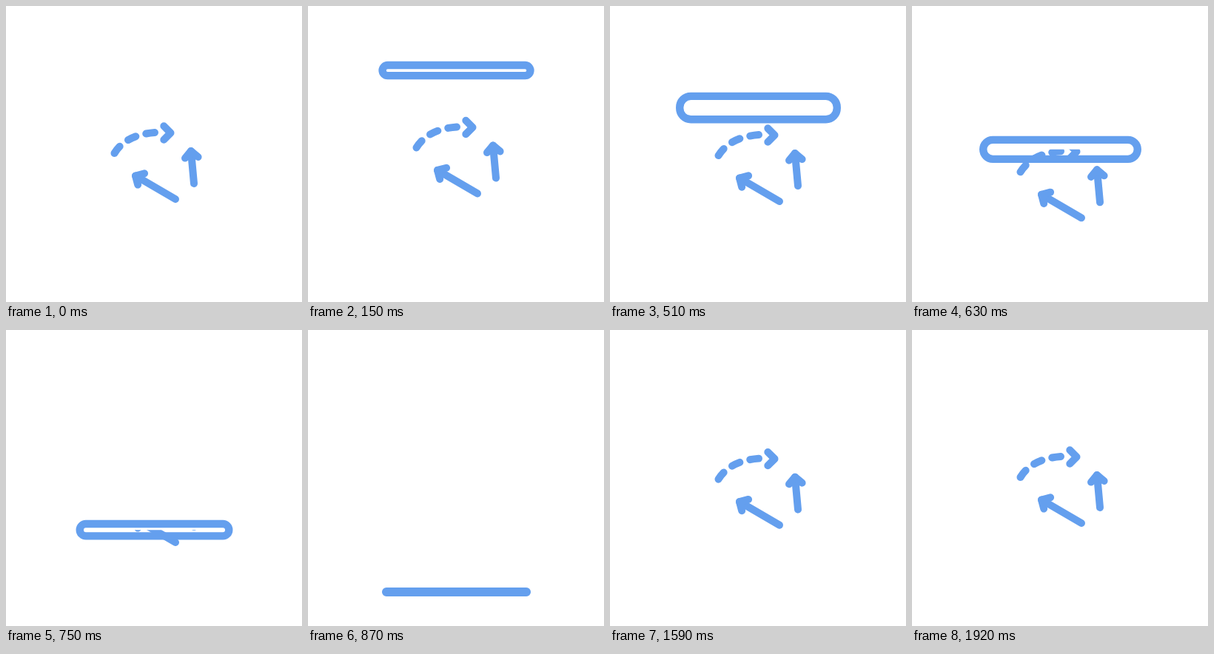
These frames come from a looping animation (400 px wide and 400 px high, 2130 ms). An HTML page with a canvas:

```html
<!DOCTYPE html>
<html>
<head>
<meta charset="utf-8">
<style>
  html, body { margin: 0; width: 100%; height: 100%; overflow: hidden; background: #fff; }
  canvas { display: block; width: 100vw; height: 100vh; }
</style>
</head>
<body>
<canvas width="400" height="400"></canvas>
<script>
const ctx = document.querySelector('canvas').getContext('2d');
const LOOP = 2130, STEP = 30;

const clamp = u => Math.max(0, Math.min(1, u));
const ramp = (t, start, time) => clamp((t - start) / time);
const smooth = (t, start, time) => {
  const u = ramp(t, start, time);
  return u * u * (3 - 2 * u);
};
const mix = (a, b, k) => a.map((v, i) => v + (b[i] - v) * k);

function line(...points) {
  ctx.beginPath();
  points.forEach(p => ctx.lineTo(...p));
  ctx.stroke();
}

// Two arms at 45 degrees either side of the backward angle
function head([x, y], back, size) {
  const arm = a => [x + size * Math.cos(a), y + size * Math.sin(a)];
  line(arm(back - Math.PI / 4), [x, y], arm(back + Math.PI / 4));
}

function arrow(tail, tip, k) {
  if (!k) return;
  const end = mix(tail, tip, k);
  line(tail, end);
  head(end, Math.atan2(tail[1] - tip[1], tail[0] - tip[0]), 12.5 * k);
}

// First part k of a dashed quadratic curve
function dashes(a, c, b, k) {
  if (!k) return;
  const mid = mix(a, c, k);
  ctx.setLineDash([11.6, 14.4]);
  ctx.beginPath();
  ctx.moveTo(...a);
  ctx.quadraticCurveTo(...mid, ...mix(mid, mix(c, b, k), k));
  ctx.stroke();
  ctx.setLineDash([]);
}

function drawArrows(t, clipY) {
  const entering = t >= 1080;
  const grow = (start, time) => entering ? smooth(t, start, time) : 1;
  const shift = entering
    ? 27 * (1 - ramp(t, 1050, 870)) ** 2.4
    : -17.5 * smooth(t, 0, 330) + 43.5 * smooth(t, 380, 270);
  ctx.save();
  ctx.beginPath();
  ctx.rect(0, clipY, 400, 400);
  ctx.clip();
  ctx.translate(0, shift);
  ctx.lineWidth = 10;
  arrow([229, 261], [175, 229.5], grow(1050, 360));
  arrow([254, 240], [250, 196], grow(1320, 240));
  dashes([146.5, 199], [162, 174], [201, 171], grow(1350, 210));
  const k = grow(1500, 90);
  if (k) head([222.5, 171.5], Math.PI, 13 * k);
  ctx.restore();
}

// The bar opens from a line, then falls and closes again
function barAt(t) {
  const open = smooth(t, 30, 270), u = ramp(t, 300, 580);
  const fall = 1 - (1 - u * u) ** 1.17;
  const h = 33.8 * open * (1 - u ** 2.6);
  return {
    y: 98 - 18.8 * (1 - open) + 261 * fall,
    w: (189.6 + 0.73 * h) * smooth(t, 0, 120),
    h
  };
}

function drawBar({ y, w, h }) {
  ctx.lineWidth = 10.4;
  ctx.beginPath();
  ctx.roundRect(200.5 - w / 2, y - h / 2, w, h, Math.min(h / 2, 15));
  ctx.stroke();
}

function draw(now) {
  const t = Math.floor(now % LOOP / STEP) * STEP;
  ctx.fillStyle = '#fff';
  ctx.fillRect(0, 0, 400, 400);
  ctx.strokeStyle = '#649fee';
  ctx.lineCap = ctx.lineJoin = 'round';
  const bar = t >= 30 && t < 930 ? barAt(t) : null;
  if (t < 930 || t >= 1080) drawArrows(t, bar ? bar.y : 0);
  if (bar) drawBar(bar);
}

const begin = performance.now();
function tick() {
  draw(performance.now() - begin);
  requestAnimationFrame(tick);
}
tick();
</script>
</body>
</html>
```
